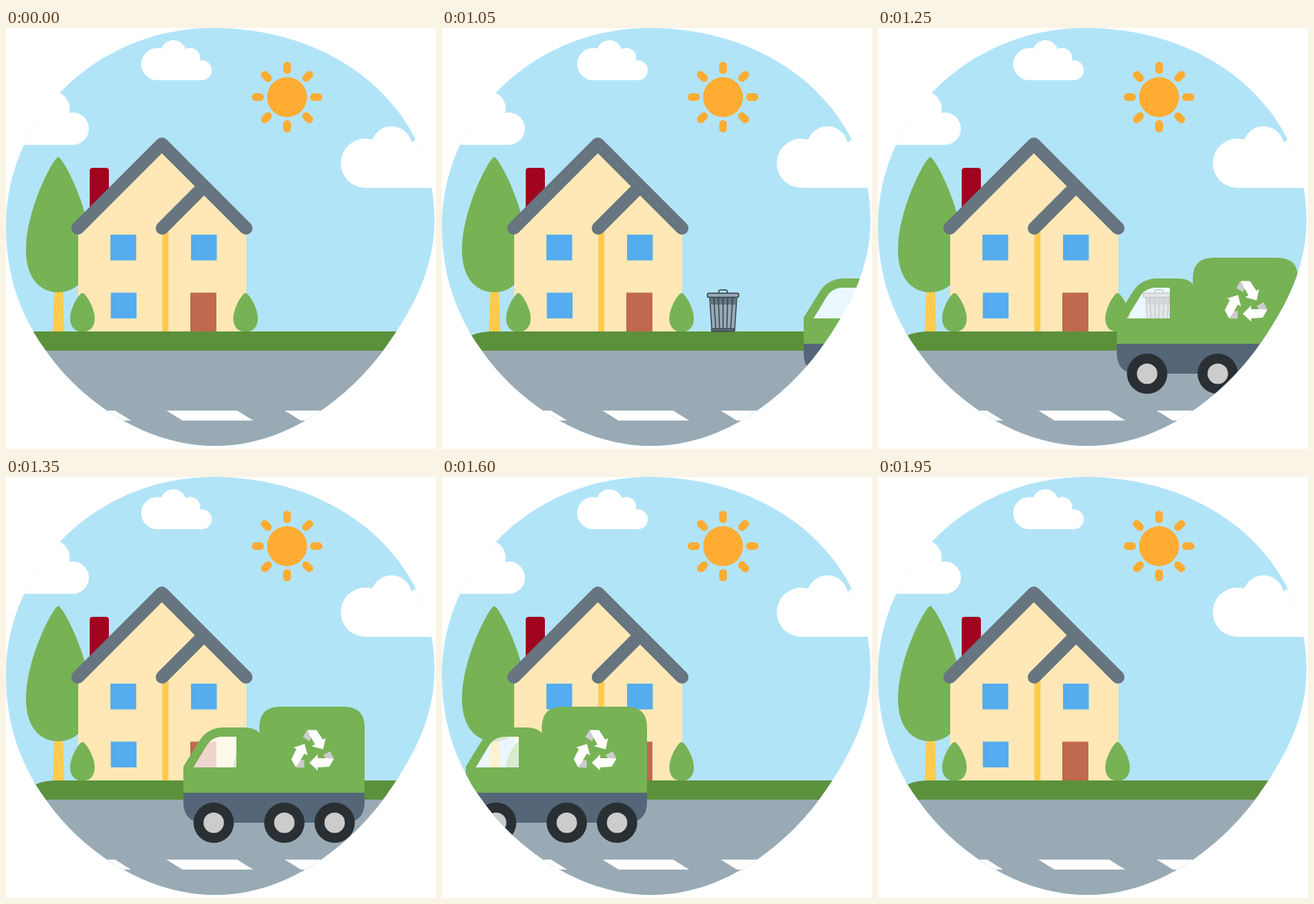
These frames come from a looping animation (560x548 px, 2 s). An HTML page:

```html
<!DOCTYPE html>
<html lang="en">
<head>
<meta charset="utf-8">
<title>Collection day</title>
<style>
  html, body { margin: 0; width: 100%; height: 100%; overflow: hidden; background: #fff; }
  svg { display: block; width: 560px; height: 548px; }
  .truck { animation: drive 2s infinite; }
  .can { animation: can 2s infinite; }
  .late { animation: late 2s step-end infinite; }

  @keyframes drive {
    0% { transform: translateX(600px); animation-timing-function: step-end; }
    52.5% { transform: translateX(471px); animation-timing-function: steps(19, end); }
    100% { transform: translateX(-289px); }
  }
  @keyframes can {
    0% { opacity: 0; animation-timing-function: step-end; }
    2.5% { opacity: .2; animation-timing-function: steps(4, end); }
    12.5% { opacity: 1; animation-timing-function: step-end; }
    67.5%, 100% { opacity: 0; animation-timing-function: step-end; }
  }
  @keyframes late {
    0% { opacity: 0; }
    52.5%, 100% { opacity: 1; }
  }
</style>
</head>
<body>
<svg viewBox="0 0 560 548">
  <defs>
    <clipPath id="disc">
      <path d="M270 0C432 0 558 105 558 250C558 308 535 360 491 420C445 482 365 544 273 544C178 544 95 482 52 420C12 365 0 310 0 258C0 115.500 121 0 270 0Z"/>
    </clipPath>
    <rect id="ray" x="-5" y="-46" width="10" height="16" rx="5"/>
    <path id="bush" fill="#77b255" d="M0 345C-4 345-16 364-16 378C-16 390-9 395.500 0 395.500C9 395.500 16 390 16 378C16 364 4 345 0 345Z"/>
    <g id="wheel">
      <circle r="26.300" fill="#292f33"/>
      <circle r="13.300" fill="#ccc"/>
    </g>
    <g id="arrow">
      <path fill="#ccc" d="M14 4L23-1L28 8L24 14L18 9Z"/>
      <path fill="#fff" d="M-4 14L7 3V8H20L28 9L22 19L7 20V24Z"/>
    </g>
  </defs>

  <g clip-path="url(#disc)">
    <rect width="560" height="548" fill="#b2e4f8"/>

    <g fill="#ffac33" transform="translate(366 90)">
      <circle r="26"/>
      <use href="#ray"/>
      <use href="#ray" transform="rotate(45)"/>
      <use href="#ray" transform="rotate(90)"/>
      <use href="#ray" transform="rotate(135)"/>
      <use href="#ray" transform="rotate(180)"/>
      <use href="#ray" transform="rotate(225)"/>
      <use href="#ray" transform="rotate(270)"/>
      <use href="#ray" transform="rotate(315)"/>
    </g>

    <!-- clouds -->
    <g fill="#fff">
      <circle cx="197" cy="47" r="21"/>
      <circle cx="218" cy="33" r="17"/>
      <circle cx="240" cy="39" r="13"/>
      <circle cx="255" cy="55" r="13"/>
      <path d="M197 40H240L255 50V68H197Z"/>

      <circle cx="60" cy="105" r="23"/>
      <circle cx="87" cy="131" r="21"/>
      <path d="M0 86H60L72 120H87V152H0Z"/>

      <circle cx="468" cy="176" r="32"/>
      <circle cx="502" cy="155" r="27"/>
      <circle cx="545" cy="170" r="27"/>
      <path d="M468 165H560V208H468Z"/>
      <path d="M545 143H560V170H545Z"/>
    </g>

    <!-- tree -->
    <path fill="#ffcb4c" d="M63 340H74L76 396H61Z"/>
    <path fill="#77b255" d="M68 168C62 168 26 236 26 288C26 328 46 344 68 344C90 344 110 328 110 288C110 236 74 168 68 168Z"/>

    <!-- house -->
    <rect x="109" y="182" width="25" height="70" rx="4" fill="#a0041e"/>
    <path fill="#ffe8b6" d="M94 260L203 151L313 260V396H94Z"/>
    <path fill="#ffcb4c" d="M203.500 260H211.500V396H203.500Z"/>
    <path fill="none" stroke="#66757f" stroke-width="17" stroke-linecap="round" stroke-linejoin="round"
      d="M93.500 260.500L203 151L312.500 260.500M203.500 260.500L258 206"/>
    <g fill="#55acee">
      <rect x="136" y="269" width="33.500" height="33.500"/>
      <rect x="241" y="269" width="33.500" height="33.500"/>
      <rect x="136.500" y="344.500" width="33.500" height="33.500"/>
    </g>
    <rect x="240" y="344.500" width="34" height="51" fill="#c1694f"/>
    <use href="#bush" x="99.500"/>
    <use href="#bush" x="312"/>

    <!-- ground -->
    <rect y="395" width="560" height="25" fill="#5c913b"/>
    <path class="late" fill="#b2e4f8" d="M20 394H62V395Q47 396 40 399.500L34 402Z"/>
    <rect y="420" width="560" height="128" fill="#99aab5"/>
    <path fill="#fff" d="M100 498H142L163 511H100ZM209 498H301L322 511H230ZM363 498H440V511H384Z"/>

    <!-- bin -->
    <g class="can" stroke="#37474f" stroke-width="1.400" stroke-linejoin="round">
      <path fill="none" d="M360.500 345V343Q360.500 341 363 341H369Q371.500 341 371.500 343V345"/>
      <path fill="#99aab5" d="M348.500 350H384L381 394H351.500Z"/>
      <path fill="#66757f" stroke="none" d="M349 350H383.500L383 360H349.600Z"/>
      <path fill="none" d="M354 351L356.500 391M360 351L361.500 391M366 351V391M372 351L371 391M378.500 351L376 391"/>
      <rect x="351" y="391.500" width="30" height="3.300" rx="1.500" fill="#66757f"/>
      <rect x="345.500" y="345.300" width="41" height="5.200" rx="2" fill="#99aab5"/>
    </g>

    <!-- truck -->
    <g class="truck">
      <path fill="#546678" d="M0 410H236V423Q236 450 209 450H27Q0 450 0 423Z"/>
      <path fill="#77b255" fill-rule="evenodd" d="M0 411V377L21 343Q32 326 53 326H80Q92 326 99 333V326Q99 299 126 299H209Q236 299 236 326V411Z
        M13 378H69V338H52Q37 338 30 350Z"/>
      <path fill="#fff" fill-opacity=".72" d="M13 378H69V338H52Q37 338 30 350Z"/>
      <g transform="translate(168 358)">
        <use href="#arrow"/>
        <use href="#arrow" transform="rotate(120)"/>
        <use href="#arrow" transform="rotate(240)"/>
      </g>
      <use href="#wheel" x="39.500" y="450"/>
      <use href="#wheel" x="131.500" y="450"/>
      <use href="#wheel" x="197" y="450"/>
    </g>
  </g>
</svg>
</body>
</html>
```
